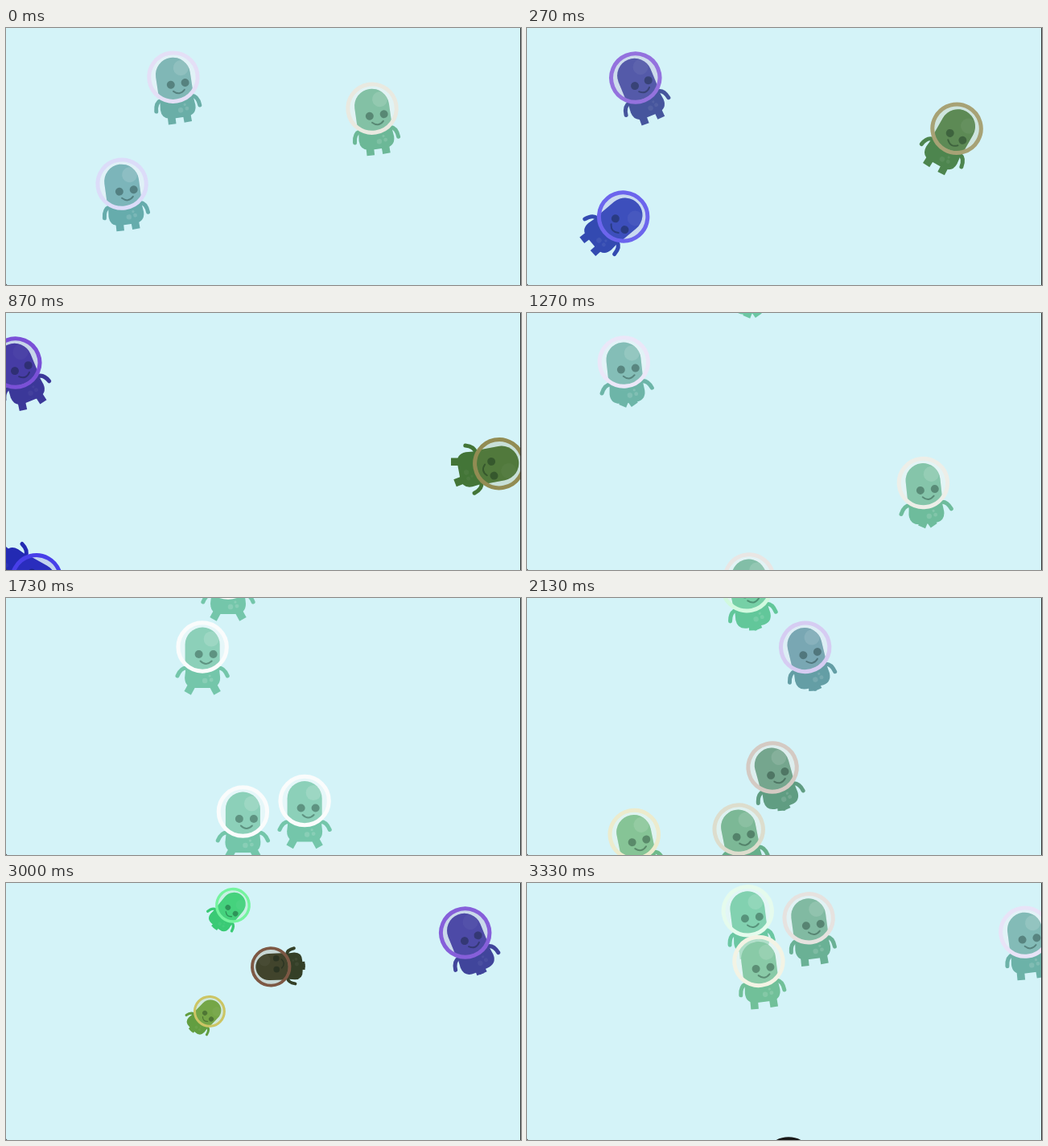
An HTML page for the animation above (3.39 s loop, 640x320 px).

```html
<!DOCTYPE html>
<html lang="en">
<head>
<meta charset="utf-8">
<title>Floating aliens</title>
<style>
html, body { margin: 0; width: 100%; height: 100%; overflow: hidden; background: #d4f3f8; }
svg { display: block; width: 100vw; height: 100vh; }
</style>
</head>
<body>
<svg id="stage" viewBox="0 0 640 320"></svg>
<script>
const LOOP = 3390, STEP = 200 / 3;   // 15 pictures a second
const WALL = 642;                    // drifters bounce between 0 and here
const PIVOT = 14;                    // centre of turning, below the helmet's centre
const SKIN = '#74c6aa', WHITE = '#fafcfc';

// Start, velocity in px/s, turn in degrees at full tint, shrink while fading
const aliens = [
  { body: '#2fcb6b', ring: '#5cf28e', x: 276, y: -88, vx: 0, vy: 41, turn: 80, shrink: .33 },
  { body: '#28260f', ring: '#663a22', x: 232, y: 521, vx: 36, vy: -139, turn: -139, shrink: .23 },
  { body: '#5f962d', ring: '#c3bb48', x: -137, y: 658, vx: 128, vy: -164, turn: 87, shrink: .39 },
  { body: '#3f6e2e', ring: '#8a8346', x: 457, y: 114, vx: 263, vy: 88, turn: 105, shrink: 0 },
  { body: '#1c1eb4', ring: '#3a30e8', x: 146, y: 208, vx: -139, vy: 135, turn: 155, shrink: 0 },
  { body: '#362d98', ring: '#7042d4', x: 210, y: 75, vx: -262, vy: 0, turn: -23, shrink: 0 },
  { body: '#222222', ring: '#181818', x: 325, y: 863, vx: 0, vy: -150, turn: 0, shrink: 0, dark: true }
];

const mod = (v, n) => ((v % n) + n) % n;
const bounce = v => WALL - Math.abs(mod(v, 2 * WALL) - WALL);
const bell = (v, width) => Math.exp(-((v / width) ** 2));
const smooth = v => {
  const u = Math.min(1, Math.max(0, v));
  return u * u * (3 - 2 * u);
};

function mix(a, b, k) {
  const part = (c, i) => parseInt(c.slice(i, i + 2), 16);
  return `rgb(${[1, 3, 5].map(i => Math.round(part(a, i) * (1 - k) + part(b, i) * k))})`;
}

// Colour pulses, walking legs and one wide stretch, shared by all
function poseAt(t) {
  const beat = mod(t - 620 + 1040, 2080) - 1040;
  const tint = smooth((780 - Math.abs(beat)) / 640);
  const walk = -Math.cos((t - 550) / 815 * 2 * Math.PI);
  const stretch = bell(t - 1500, 550);
  return {
    tint,
    spin: tint ** 3,
    lean: -18 * Math.sin(Math.PI * tint),
    fade: bell(beat - 300, 140),
    hip: 7 + 5.5 * walk,
    foot: 56 + 2 * walk,
    splay: 2 + 32 * stretch,
    arms: 24 * stretch + 9 * tint
  };
}

const HEAD = 'M-21.5-3a21.5 21.5 0 0 1 43 0V20Q0 36-21.5 20Z';
const BODY = 'M-20 20L-22 38Q-22 51-8 51H8Q22 51 22 38L20 20Z';

function limbs(side, p) {
  return `<g transform="scale(${side} 1)">
    <path d="M-19 26q-7.5 2-8 13.5" fill="none" stroke="currentColor" stroke-width="5"
      stroke-linecap="round" transform="rotate(${p.arms} -19 26)"/>
    <rect x="${-p.hip - 4.8}" y="42" width="9.6" height="${p.foot - 42 + 1}"
      transform="rotate(${p.splay} ${-p.hip} 46)"/>
  </g>`;
}

function draw(a, t, p) {
  const x = bounce(a.x + a.vx * t / 1000), y = a.y + a.vy * t / 1000;
  if (y < -70 || y > 400) return '';
  const k = a.dark ? 1 : p.tint, pale = 1 - k;
  const color = mix(SKIN, a.body, k), ring = mix(WHITE, a.ring, k);
  const angle = a.dark ? 0 : a.turn * p.spin + p.lean;
  return `<g transform="translate(${x} ${y}) rotate(${angle}) scale(${1 - a.shrink * p.fade}) translate(0 ${-PIVOT})"
      fill="${color}" color="${color}">
    ${limbs(1, p)}${limbs(-1, p)}
    <path d="${BODY}"/>
    <g fill="#fff" opacity="${.03 + .12 * pale}">
      <circle cx="3" cy="42" r="3.2"/><circle cx="11" cy="41" r="2.4"/><circle cx="9" cy="36" r="1.6"/>
    </g>
    <circle r="30" fill="${mix(WHITE, a.body, .35 * k)}" opacity=".5"/>
    <path d="${HEAD}"/>
    <path d="${HEAD}" fill="${ring}" opacity=".18"/>
    <circle cx="11" cy="-10" r="9.5" fill="#fff" opacity="${.02 + .13 * pale}"/>
    <g opacity=".32" fill="#00140f">
      <circle cx="-4.5" cy="9" r="5"/><circle cx="13.5" cy="9" r="5"/>
      <path d="M-2.5 17.5q7 7 14 0" fill="none" stroke="#00140f" stroke-width="2" stroke-linecap="round"/>
    </g>
    <circle r="30.2" fill="none" stroke="${ring}" stroke-width="5"/>
  </g>`;
}

const stage = document.getElementById('stage');
const edge = `<path d="M639.5 0V320" stroke="#333"/><path d="M0 318.5L1.5 320H0Z" fill="#444"/>`;
let last = -1;

function render(now) {
  const step = Math.floor((now % LOOP) / STEP + .06);
  if (step === last) return;
  last = step;
  const t = Math.min(step, 50) * STEP;
  const p = poseAt(t);
  stage.innerHTML = '<rect width="640" height="320" fill="#d4f3f8"/>'
    + aliens.map(a => draw(a, t, p)).join('') + edge;
}

const start = performance.now();
function tick() {
  render(performance.now() - start);
  requestAnimationFrame(tick);
}
tick();
</script>
</body>
</html>
```
